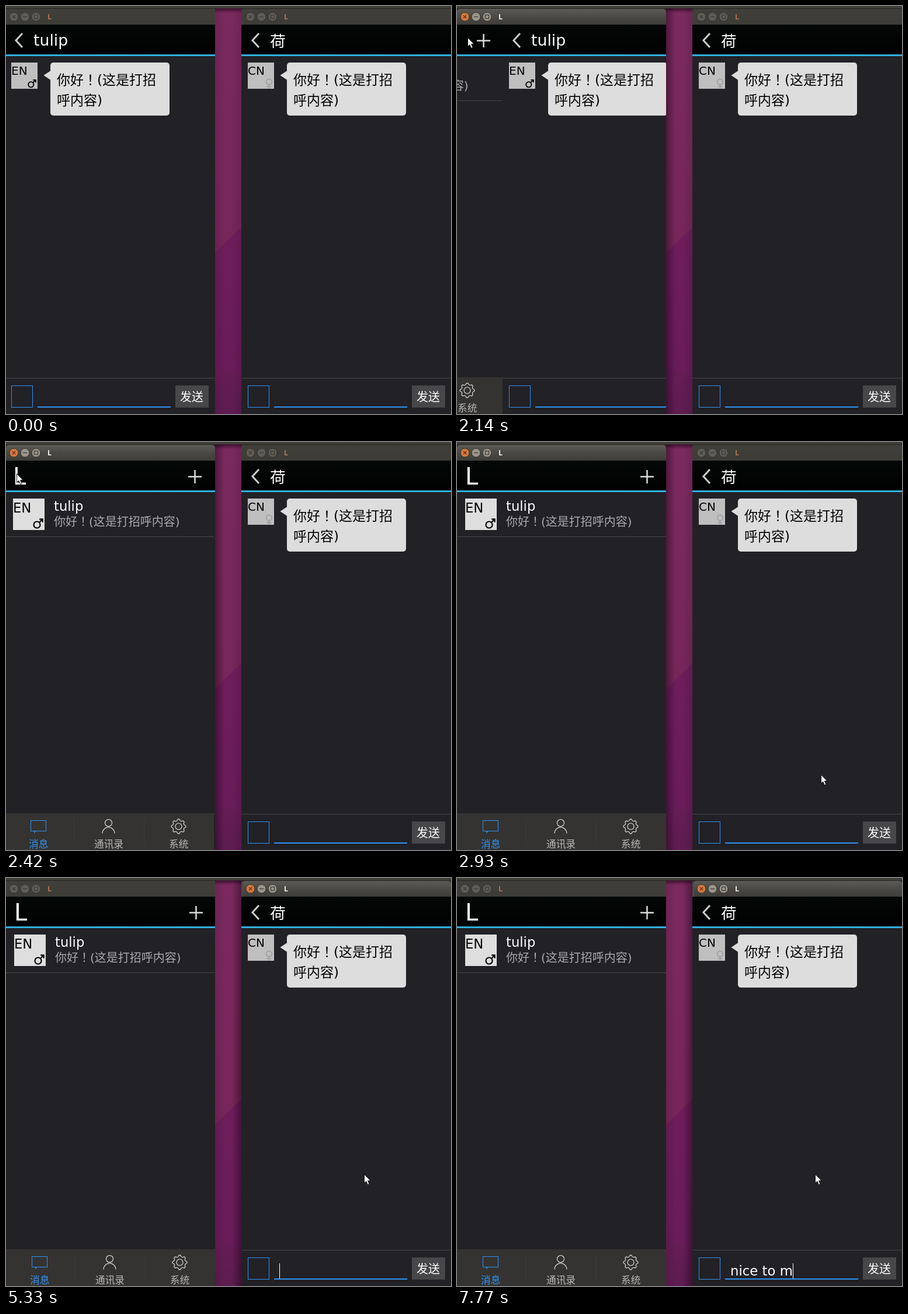
Animation, 762 px wide and 700 px high, one loop 8 s. Source, as an HTML page with a canvas:

```html
<!DOCTYPE html>
<html lang="zh">
<head>
<meta charset="utf-8">
<title>Chat</title>
<style>
html, body { margin: 0; width: 100%; height: 100%; overflow: hidden; background: #222126; }
canvas { display: block; }
</style>
</head>
<body>
<canvas id="stage" width="762" height="700"></canvas>
<script>
const c = document.getElementById('stage').getContext('2d');
const LOOP = 8000;
const NAME = 'tulip', PEER = '荷';
const BG = '#222126', BLUE = '#2f93f6', LINE = '#47464a', INK = '#e8e8e8';
const LATIN = '"DejaVu Sans", "Noto Sans CJK SC", "Noto Sans CJK", sans-serif';
const CENTRED = '"Noto Sans CJK TC", "Noto Sans CJK SC", sans-serif';

const PAGE = 360, PUSH_START = 2088, PUSH_TIME = 400, PUSH_TICK = 50;
const LEFT_FOCUS = 1990, RIGHT_FOCUS = 3700;
const TYPED = 'nice to m', TYPE_START = 5840, TYPE_TIME = 1930;
const BLINK_START = 4400, BLINK = 930;

const smooth = k => k * k * (3 - 2 * k);
const easeOut = k => Math.sin(k * Math.PI / 2);
const clamp = k => Math.min(1, Math.max(0, k));

// Each move continues from where the one before it ended; bow bends its path.
const POINTER_START = { x: 768, y: 184 };
const MOVES = [
  { from: 900, to: 1640, x: 18, y: 54, ease: smooth },
  { from: 2480, to: 3050, x: 657, y: 627, ease: easeOut, bow: 1.9 },
  { from: 3050, to: 3600, x: 595, y: 659, ease: smooth },
  { from: 3930, to: 4200, x: 587, y: 668, ease: smooth },
  { from: 4570, to: 4880, x: 613, y: 508, ease: smooth }
];

function rect(x, y, w, h, fill) {
  c.fillStyle = fill;
  c.fillRect(x, y, w, h);
}

function box(x, y, w, h, color, width = 1) {
  c.strokeStyle = color;
  c.lineWidth = width;
  c.strokeRect(x, y, w, h);
}

function stroke(color, width) {
  c.strokeStyle = color;
  c.lineWidth = width;
  c.stroke();
}

function path(points, close) {
  c.beginPath();
  points.forEach(([x, y]) => c.lineTo(x, y));
  if (close) c.closePath();
}

function line(color, width, ...points) {
  path(points);
  stroke(color, width);
}

function shape(fill, ...points) {
  path(points, true);
  c.fillStyle = fill;
  c.fill();
}

function ring(x, y, r, color, width) {
  c.beginPath();
  c.arc(x, y, r, 0, Math.PI * 2);
  stroke(color, width);
}

function round(x, y, w, h, radius, fill) {
  c.beginPath();
  c.roundRect(x, y, w, h, radius);
  c.fillStyle = fill;
  c.fill();
}

function gradient(x0, y0, x1, y1, ...colors) {
  const g = c.createLinearGradient(x0, y0, x1, y1);
  colors.forEach((color, i) => g.addColorStop(i / (colors.length - 1), color));
  return g;
}

const down = (y0, y1, ...colors) => gradient(0, y0, 0, y1, ...colors);

// The full-width exclamation mark sits in the middle of its cell.
function text(s, x, y, size, color) {
  c.fillStyle = color;
  for (const part of s.split(/(！)/)) {
    c.font = `${size}px ${part === '！' ? CENTRED : LATIN}`;
    c.fillText(part, x, y);
    x += c.measureText(part).width;
  }
  return x;
}

function shifted(x, y, draw) {
  c.save();
  c.translate(x, y);
  draw();
  c.restore();
}

function male(x, y, scale) {
  shifted(x, y, () => {
    c.scale(scale, scale);
    ring(0, 0, 4.6, '#000', 1.8);
    line('#000', 1.8, [3.3, -3.3], [8, -8]);
    line('#000', 1.8, [3.5, -8], [8, -8], [8, -3.5]);
  });
}

function female(x, y) {
  const color = '#9b9b9b';
  ring(x, y, 4.8, color, 1.5);
  line(color, 1.5, [x, y + 5], [x, y + 12]);
  line(color, 1.5, [x - 4, y + 8.5], [x + 4, y + 8.5]);
}

function header(x, w) {
  rect(x, 32, w, 51, down(32, 83, '#050808', '#000'));
  rect(x, 83, w, 3, '#2fb0e0');
}

function chatPage(name, nameY, tag, drawSign) {
  rect(-2, 32, PAGE, 668, BG);
  header(-2, PAGE);
  line('#cfcfcf', 3, [28, 47], [17, 59], [28, 71]);
  text(name, 47, nameY, 26.7, '#fff');

  rect(9, 97, 45, 45, '#bfbfbf');
  text(tag, 9, 118, 20, '#000');
  drawSign();

  round(76, 97, 204, 91, 5, '#ddd');
  shape('#ddd', [64.5, 119], [76.5, 111], [76.5, 127]);
  text('你好！(这是打招', 87, 135, 23, '#000');
  text('呼内容)', 87, 170, 23, '#000');

  rect(-2, 638, PAGE, 1, LINE);
  box(9.5, 651.5, 36, 37, BLUE);
  rect(54, 687, 228, 2, BLUE);
  rect(290, 651, 57, 38, '#474649');
  text('发送', 298, 678, 20, '#fff');
}

function messageIcon(x, y) {
  box(x, y, 26, 18, BLUE);
  line(BLUE, 1, [x + 6, y + 18], [x + 6, y + 21], [x + 9, y + 18]);
}

function personIcon(x, y) {
  ring(x, y, 6, INK, 1.1);
  c.beginPath();
  c.ellipse(x, y + 18, 10.5, 10.5, 0, Math.PI, 0);
  stroke(INK, 1.1);
}

function gearIcon(x, y) {
  const teeth = 8, steps = teeth * 4;
  const points = Array.from({ length: steps }, (_, i) => {
    const a = (i - .5) / steps * Math.PI * 2;
    const r = i % 4 < 2 ? 12.4 : 10;
    return [x + r * Math.cos(a), y + r * Math.sin(a)];
  });
  path(points, true);
  stroke(INK, 1.1);
  ring(x, y, 5.5, INK, 1.1);
}

function listPage() {
  rect(0, 32, 358, 668, BG);
  header(0, 358);
  text('L', 14, 73, 40, '#fff');
  line('#ddd', 2.5, [314, 59.5], [337, 59.5]);
  line('#ddd', 2.5, [325.5, 48], [325.5, 71]);

  rect(14, 97, 54, 54, '#dedede');
  text('EN', 14, 121, 22.7, '#000');
  male(55, 142, 1.2);
  text(NAME, 84, 118, 22.7, '#fff');
  text('你好！(这是打招呼内容)', 84, 143.5, 20, '#aaa9ab');
  rect(0, 162, 358, 1, LINE);

  rect(0, 637, 358, 63, '#343331');
  for (const x of [118, 238]) rect(x, 647, 1, 44, '#3c3b39');
  messageIcon(44.5, 649.5);
  personIcon(177.5, 653.5);
  gearIcon(297.5, 659.5);
  text('消息', 41, 696, 16.7, BLUE);
  text('通讯录', 153, 696, 16.7, '#b8b8b8');
  text('系统', 281, 696, 16.7, '#b8b8b8');
}

function titleButton(x, y, index, focused) {
  const closes = index === 0;
  const face = !focused ? '#5f5d56' : closes ? '#d4783f' : '#9a958a';
  const mark = focused && closes ? '#6b2e14' : '#3a3934';
  round(x - 7.5, y - 7.5, 15, 15, 7.5, face);
  ring(x, y, 7.5, '#33322e', 1);
  if (closes) {
    for (const s of [-1, 1]) line(mark, 1.2, [x - 2.5, y - 2.5 * s], [x + 2.5, y + 2.5 * s]);
  } else if (index === 1) {
    line(mark, 1.2, [x - 3.5, y], [x + 3.5, y]);
  } else {
    box(x - 3, y - 3, 6, 6, mark, 1.2);
  }
}

function titleBar(x, w, focused) {
  const fill = focused
    ? down(5, 32, '#5d5b56', '#4a4944', '#3e3d39')
    : down(5, 32, '#403f3a', '#3d3c37');
  round(x, 5, w, 27, focused ? [5, 5, 0, 0] : 0, fill);
  for (let i = 0; i < 3; i++) titleButton(x + 13.5 + 19 * i, 18.5, i, focused);
  c.font = 'bold 12.5px "Open Sans", sans-serif';
  c.fillStyle = focused ? '#f2f0ea' : '#b3734d';
  c.fillText('L', x + 71, 23);
}

function desktop(leftFocused, rightFocused) {
  const shade = a => `rgba(20,0,18,${a})`;
  const shadow = focused => shade(focused ? .42 : .12);
  rect(358, 4, 45, 696, down(4, 420, '#7a2a5e', '#762659'));
  shape(down(380, 640, '#6e1d5a', '#681c59'), [358, 424], [403, 379], [403, 700], [358, 700]);
  shape(down(618, 700, '#671d57', '#5d1c50'), [358, 618], [403, 637], [403, 700], [358, 700]);

  rect(358, 4, 16, 696, gradient(358, 0, 374, 0, shadow(leftFocused), shade(0)));
  rect(387, 4, 16, 696, gradient(403, 0, 387, 0, shadow(rightFocused), shade(0)));
  rect(358, 4, 45, 8, down(4, 12, shade(.6), shade(0)));
  rect(0, 0, 762, 4, '#3f3e39');
  for (const x of [0, 403]) rect(x, 4, 359 - (x ? 0 : 1), 28, '#25241f');
}

function leftWindow(t, focused) {
  const tick = Math.floor((t - 20) / PUSH_TICK) * PUSH_TICK + 20;
  const u = clamp((tick - PUSH_START) / PUSH_TIME);
  const rest = Math.round(PAGE * (1 - u) ** 3);
  c.save();
  c.beginPath();
  c.rect(0, 32, 358, 668);
  c.clip();
  shifted(-rest, 0, listPage);
  shifted(PAGE - rest, 0, () => chatPage(NAME, 68, 'EN', () => male(42.8, 134.8, 1)));
  c.restore();
  titleBar(0, 358, focused);
}

function rightWindow(t, focused) {
  shifted(405, 0, () => chatPage(PEER, 70, 'CN', () => female(45.5, 130)));
  shifted(405, 0, () => titleBar(0, 357, focused));
  rect(403, 6, 3, 26, focused ? '#4c4b46' : '#3f3e39');
  typing(t);
}

// Keys come slightly faster towards the end.
function typing(t) {
  const u = (t - TYPE_START) / TYPE_TIME;
  const count = u < 0 ? 0 : 1 + Math.floor((TYPED.length - 1) * u ** (4 / 3));
  const end = text(TYPED.slice(0, count), 468, 682, 22.8, '#fff');
  const blinkOn = t >= BLINK_START && (t - BLINK_START) % BLINK < BLINK / 2;
  if (count || blinkOn) rect(Math.round(end), 661, 1, 26, '#fff');
}

function pointer(t) {
  let { x, y } = POINTER_START;
  for (const m of MOVES) {
    const k = m.ease(clamp((t - m.from) / (m.to - m.from)));
    x += (m.x - x) * k;
    y += (m.y - y) * k ** (m.bow || 1);
  }
  shifted(x, y, () => {
    shape('#fff', [.5, .5], [.5, 15.5], [3.8, 12.4], [6.4, 18.3], [9, 17.2],
      [6.5, 11.4], [11, 11.2]);
    stroke('#111', 1);
  });
}

function frame() {
  const t = (performance.now() - start) % LOOP;
  const rightFocused = t >= RIGHT_FOCUS;
  const leftFocused = t >= LEFT_FOCUS && !rightFocused;
  desktop(leftFocused, rightFocused);
  leftWindow(t, leftFocused);
  rightWindow(t, rightFocused);
  pointer(t);
  requestAnimationFrame(frame);
}

const start = performance.now();
frame();
</script>
</body>
</html>
```
